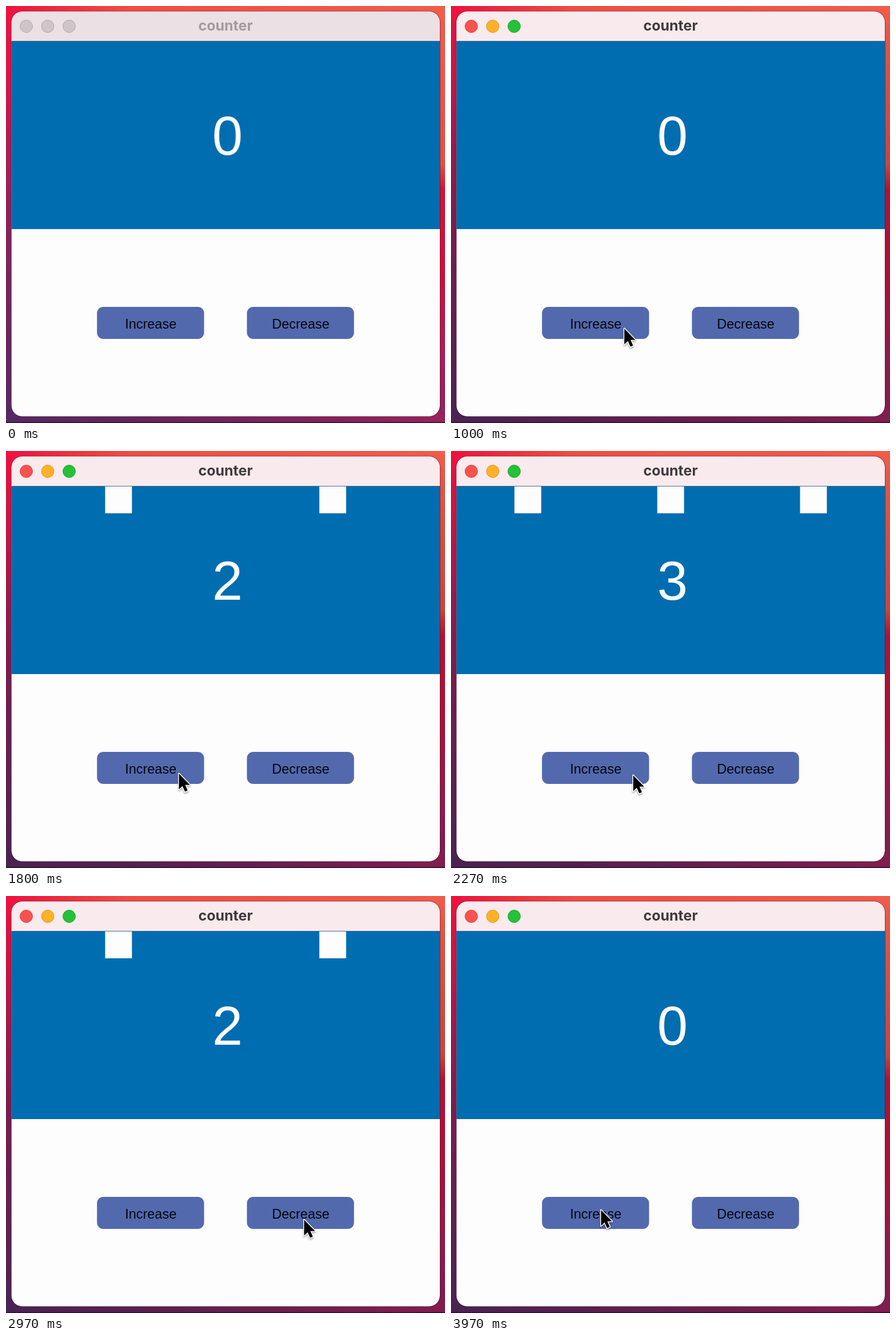
These frames come from a looping animation (768 by 729 pixels, 4.03 s). An HTML page:

```html
<!DOCTYPE html>
<html lang="en">
<head>
<meta charset="utf-8">
<title>counter</title>
<style>
  html, body { margin: 0; width: 100%; height: 100%; overflow: hidden; background: #5a2a5e; }
  svg { display: block; width: 768px; height: 729px; }
  text { text-anchor: middle; }
  .title { font: 700 25px Inter, sans-serif; }
  .count { font: 96px "Liberation Sans", Arial, sans-serif; fill: #fdfdfd; }
  .label { font: 23.5px "Liberation Sans", Arial, sans-serif; fill: #050508; }
</style>
</head>
<body>
<svg viewBox="0 0 768 729">
  <defs>
    <linearGradient id="left" x2="0" y2="1">
      <stop offset="0" stop-color="#f0103f"/>
      <stop offset=".15" stop-color="#e41244"/>
      <stop offset=".35" stop-color="#ad1c52"/>
      <stop offset=".6" stop-color="#81245d"/>
      <stop offset="1" stop-color="#552a62"/>
    </linearGradient>
    <linearGradient id="right" x2="0" y2="1">
      <stop offset="0" stop-color="#f35b4a"/>
      <stop offset=".38" stop-color="#e74f43"/>
      <stop offset=".44" stop-color="#d91133"/>
      <stop offset=".65" stop-color="#cc123f"/>
      <stop offset=".85" stop-color="#a91f58"/>
      <stop offset="1" stop-color="#96215c"/>
    </linearGradient>
    <linearGradient id="top">
      <stop offset="0" stop-color="#f0103f"/>
      <stop offset=".12" stop-color="#f02b3d"/>
      <stop offset=".28" stop-color="#f24c43"/>
      <stop offset="1" stop-color="#f35b4a"/>
    </linearGradient>
    <linearGradient id="bottom">
      <stop offset="0" stop-color="#552a62"/>
      <stop offset=".3" stop-color="#66265f"/>
      <stop offset="1" stop-color="#9c225d"/>
    </linearGradient>
    <linearGradient id="shade" x2="0" y2="1">
      <stop offset="0" stop-color="#200818" stop-opacity="0"/>
      <stop offset=".12" stop-color="#200818" stop-opacity=".08"/>
      <stop offset=".5" stop-color="#200818" stop-opacity=".18"/>
      <stop offset="1" stop-color="#200818" stop-opacity=".2"/>
    </linearGradient>
    <clipPath id="frame"><rect x="9.5" y="9.5" width="749.5" height="708" rx="19"/></clipPath>
  </defs>

  <rect width="384" height="729" fill="url(#left)"/>
  <rect x="384" width="384" height="729" fill="url(#right)"/>
  <rect x="0" width="768" height="30" fill="url(#top)"/>
  <rect x="0" y="700" width="768" height="29" fill="url(#bottom)"/>
  <rect id="shadow" width="768" height="729" fill="url(#shade)"/>
  <rect y="727.5" width="768" height="1.5" fill="#2c1230"/>

  <g clip-path="url(#frame)">
    <rect x="9" y="9" width="751" height="710" fill="#fdfdfd"/>
    <rect id="bar" x="9" y="9" width="751" height="53"/>
    <rect x="9" y="62" width="751" height="328" fill="#006db0"/>
    <rect x="9" y="61.2" width="751" height="1" fill="#1d4f78"/>
  </g>
  <rect x="9" y="9" width="750.5" height="709" rx="19.5" fill="none" stroke="#400c22" stroke-opacity=".5"/>

  <g id="lights"></g>
  <text id="title" class="title" x="384" y="43">counter</text>
  <g id="squares" fill="#fdfdfd"></g>
  <text id="count" class="count" x="387.5" y="260">0</text>
  <g id="buttons"></g>
  <path id="cursor" d="M0 0V27.5L6.2 21.7L10.6 31.6L15.3 29.6L11 19.8H19.2Z" fill="#000"
        stroke="#fff" stroke-width="3" stroke-linejoin="round" paint-order="stroke"
        style="filter:drop-shadow(0 2px 1.5px rgba(0,0,0,.35))"/>
</svg>
<script>
const LOOP = 4030;
const FOCUS_AT = 900;
const WINDOW = { x: 9.5, width: 749.5 };
const SQUARE = 46.9;

// [time, count]
const counts = [[0, 0], [1270, 1], [1590, 2], [1960, 3], [2840, 2], [3150, 1], [3470, 0]];

// [time, x, y] of the pointer tip
const path = [
  [400, 678, 738], [470, 629, 699], [650, 440, 606], [850, 303, 563],
  [1800, 302, 563], [2170, 302, 563], [2270, 318, 566], [2600, 517, 566],
  [2970, 521, 565], [3590, 521, 565], [3800, 392, 489], [3970, 262, 548]
];

const lightColors = [["#f6534f", "#d9413d"], ["#fdb127", "#dc9622"], ["#25c138", "#1da62d"]];
const idleLight = ["#cfc5c8", "#b2a8ab"];

const byId = id => document.getElementById(id);

function add(parent, tag, attrs, text = "") {
  const node = document.createElementNS("http://www.w3.org/2000/svg", tag);
  for (const key in attrs) node.setAttribute(key, attrs[key]);
  node.textContent = text;
  return parent.appendChild(node);
}

const lights = lightColors.map((_, i) =>
  add(byId("lights"), "circle", { cx: 35.5 + i * 37.5, cy: 35.5, r: 10.9 }));

const squares = [0, 1, 2].map(() =>
  add(byId("squares"), "rect", { y: 62, width: SQUARE, height: SQUARE }));

[["Increase", 159.2], ["Decrease", 421.5]].forEach(([label, x]) => {
  add(byId("buttons"), "rect", { x, y: 526, width: 187.3, height: 56, rx: 11, fill: "#5269ae" });
  add(byId("buttons"), "text", { class: "label", x: x + 94, y: 563.5 }, label);
});

const slope = (i, axis) =>
  (path[i + 1][axis] - path[i][axis]) / (path[i + 1][0] - path[i][0]);

function tangent(i, axis) {
  if (i === 0) return slope(0, axis);
  if (i === path.length - 1) return 0;
  const a = slope(i - 1, axis), b = slope(i, axis);
  return a * b <= 0 ? 0 : 2 * a * b / (a + b);
}

// Monotone cubic: smooth through the points, still at the rests.
function along(t, axis) {
  const last = path.length - 1;
  if (t >= path[last][0]) return path[last][axis];
  const i = Math.max(0, path.findIndex(p => p[0] > t) - 1);
  const span = path[i + 1][0] - path[i][0];
  const u = Math.max(0, (t - path[i][0]) / span), v = 1 - u;
  return path[i][axis] * v * v * (1 + 2 * u) + tangent(i, axis) * span * u * v * v
    + path[i + 1][axis] * u * u * (3 - 2 * u) - tangent(i + 1, axis) * span * u * u * v;
}

function render(t) {
  const active = t >= FOCUS_AT;
  byId("bar").setAttribute("fill", active ? "#f8eaed" : "#ebe0e4");
  byId("title").setAttribute("fill", active ? "#403a3d" : "#a4999d");
  byId("shadow").setAttribute("opacity", active ? 1 : 0.1);
  lights.forEach((light, i) => {
    const [fill, stroke] = active ? lightColors[i] : idleLight;
    light.setAttribute("fill", fill);
    light.setAttribute("stroke", stroke);
  });

  const count = counts.filter(c => c[0] <= t).pop()[1];
  byId("count").textContent = count;
  squares.forEach((square, i) => {
    square.style.display = i < count ? "" : "none";
    if (i < count) {
      square.setAttribute("x", WINDOW.x + WINDOW.width * (i + 0.5) / count - SQUARE / 2);
    }
  });

  const cursor = byId("cursor");
  cursor.style.display = t < path[0][0] ? "none" : "";
  cursor.setAttribute("transform", `translate(${along(t, 1) + 0.5} ${along(t, 2) + 1})`);
}

const start = performance.now();
function tick() {
  render((performance.now() - start) % LOOP);
  requestAnimationFrame(tick);
}
tick();
</script>
</body>
</html>
```
